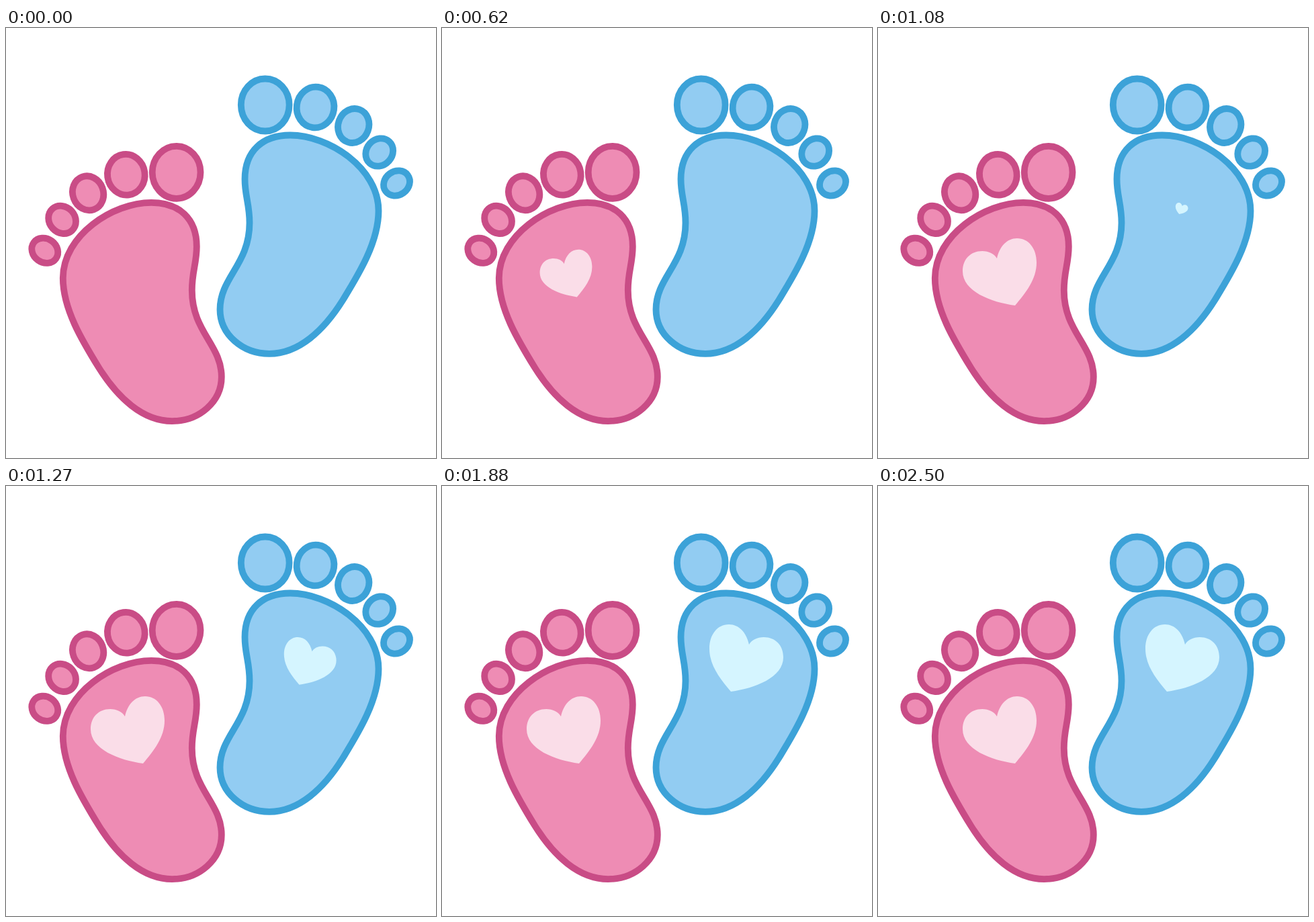
Recreate the animation shown at these times as an HTML page. Size 640x640 px, loop 2.54 s.

```html
<!DOCTYPE html>
<html lang="en">
<head>
<meta charset="utf-8">
<title>Baby footprints</title>
<style>
  html, body { margin: 0; height: 100%; overflow: hidden; background: #fff; }
  svg { display: block; width: 100%; height: 100%; }
</style>
</head>
<body>
<svg viewBox="0 0 640 640">
  <defs>
    <g id="foot" stroke-width="9.8">
      <path d="M423 159.5C480 159.5 554.5 208 554.5 272C554.5 318 526 365 501 405.5C473 450 436 484.8 392 484.8
        C352 484.8 318.5 456 318.5 419C318.5 371 362.5 352 362.5 290C362.5 262 355.5 250 355.5 225C355.5 183 382 159.5 423 159.5Z"/>
      <ellipse cx="385.7" cy="114.5" rx="35.9" ry="39"/>
      <ellipse rx="27.8" ry="30.4" transform="translate(460.5 118) rotate(8)"/>
      <ellipse rx="22.8" ry="25.8" transform="translate(517.2 145.5) rotate(20)"/>
      <ellipse rx="19.2" ry="21.8" transform="translate(555.7 185) rotate(42)"/>
      <ellipse rx="17.6" ry="20.4" transform="translate(581.5 231) rotate(54)"/>
    </g>
    <path id="heart" d="M177 343C181 325 192 313 207 313C224 313 236 328 236 349C236 374 220 394 204 413
      C168 408 126 392 126 362C126 344 138 332 155 332C165 332 173 336 177 343Z"/>
  </defs>
  <use href="#foot" fill="#92ccf2" stroke="#3ca2d8"/>
  <use href="#foot" fill="#ee8cb4" stroke="#c94c86" transform="translate(639.3 100.3) scale(-1 1)"/>
  <use id="pinkHeart" href="#heart" fill="#fadde8"/>
  <g transform="matrix(-1 0 0 1 634 -107)"><use id="blueHeart" href="#heart" fill="#d5f5ff"/></g>
</svg>
<script>
  const LOOP = 2540, GROW = 500;
  const hearts = [
    { el: document.getElementById('pinkHeart'), start: 300, x: 193, y: 370 },
    { el: document.getElementById('blueHeart'), start: 950, x: 182, y: 378 }
  ];

  const smooth = u => u * u * (3 - 2 * u);

  function draw(now) {
    const t = now % LOOP;
    for (const { el, start, x, y } of hearts) {
      const s = smooth(Math.min(1, Math.max(0, (t - start) / GROW)));
      el.setAttribute('visibility', s > 0 ? 'visible' : 'hidden');
      el.setAttribute('transform', `translate(${x} ${y}) scale(${s}) translate(${-x} ${-y})`);
    }
  }

  const origin = performance.now();
  function tick() {
    draw(performance.now() - origin);
    requestAnimationFrame(tick);
  }
  tick();
</script>
</body>
</html>
```
